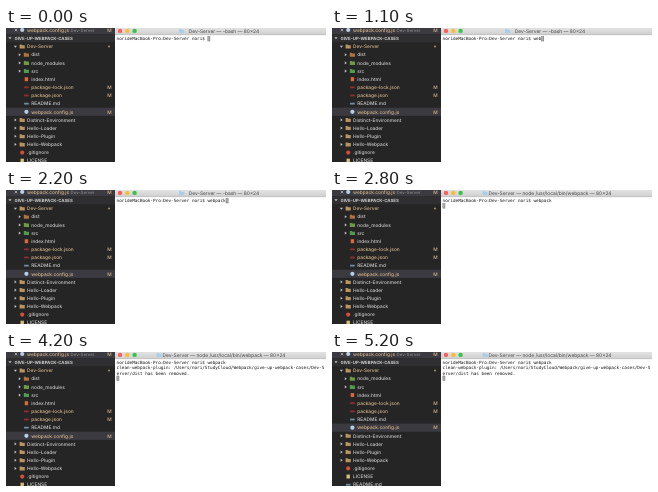
An HTML page for the animation above (5.4 s loop, 320 by 134 pixels).

```html
<!DOCTYPE html>
<html lang="en">
<head>
<meta charset="utf-8">
<title>Running webpack</title>
<style>
  html, body { margin: 0; width: 100%; height: 100%; overflow: hidden; background: #fff; }
  svg { display: block; width: 100%; height: 100%; }
  text { white-space: pre; text-rendering: geometricPrecision; }
  .ui { font-family: Inter, "Open Sans", sans-serif; font-size: 4.8px; font-weight: 500; }
  .title { font-size: 4.88px; font-weight: 400; text-anchor: middle; }
  .mono { font-family: "DejaVu Sans Mono", monospace; font-size: 4.32px; fill: #111; }
</style>
</head>
<body>
<svg id="stage" viewBox="0 0 320 134">
  <defs>
    <linearGradient id="bar" x2="0" y2="1">
      <stop stop-color="#e3e2e3"/><stop offset="1" stop-color="#d0cfd0"/>
    </linearGradient>
    <clipPath id="side"><rect width="109" height="134"/></clipPath>
  </defs>
  <g id="sidebar" clip-path="url(#side)"></g>
  <g id="terminal"></g>
</svg>
<script>
const LOOP = 5400, ROW = 8.15, COL = 2.6, LINE = 5.16, LEFT = 110.6, TOP = 8.2, EDGE = 109;
const GOLD = '#d9b98a', GREY = '#cdcdcd', DIM = '#8a8a8a', ACTIVE = '#3b3a40';
const TAN = '#b8925f', NPM = '#8f2f2c', CONFIG = '#b4cfe6', README = '#6f8fa5';
const sidebar = document.getElementById('sidebar');
const terminal = document.getElementById('terminal');

function add(parent, tag, attrs, content) {
  const node = document.createElementNS('http://www.w3.org/2000/svg', tag);
  for (const key in attrs) node.setAttribute(key, attrs[key]);
  if (content) node.textContent = content;
  parent.appendChild(node);
  return node;
}

const label = (parent, x, y, str, fill, extra) =>
  add(parent, 'text', { class: 'ui', x, y, fill, ...extra }, str);

function chevron(parent, x, y, open) {
  const d = open ? `M${x - 1.6} ${y - 0.9}h3.2l-1.6 2z` : `M${x - 0.8} ${y - 1.6}v3.2l2 -1.6z`;
  add(parent, 'path', { d, fill: '#c4c4c4' });
}

const icons = {
  folder: (g, x, y, fill) =>
    add(g, 'path', { d: `M${x} ${y - 2}h2l.7 .7h2.5v3.3h-5.2z`, fill }),
  page: (g, x, y, fill) =>
    add(g, 'rect', { x: x + 0.9, y: y - 2, width: 3.4, height: 4, fill }),
  wide: (g, x, y, fill) =>
    add(g, 'rect', { x: x + 0.3, y: y - 0.9, width: 4.6, height: 1.8, fill }),
  round: (g, x, y, fill) =>
    add(g, 'circle', { cx: x + 2.6, cy: y, r: 2.1, fill })
};

// name, depth, icon, icon colour, modified
const files = [
  ['Dev-Server', 0, 'folder', TAN, 1],
  ['dist', 1, 'folder', '#b0713c', 0],
  ['node_modules', 1, 'folder', '#6f9a44', 0],
  ['src', 1, 'folder', '#4f9a4f', 0],
  ['index.html', 1, 'page', '#d9683c', 0],
  ['package-lock.json', 1, 'wide', NPM, 1],
  ['package.json', 1, 'wide', NPM, 1],
  ['README.md', 1, 'wide', README, 0],
  ['webpack.config.js', 1, 'round', CONFIG, 1],
  ['Distinct-Environment', 0, 'folder', TAN, 0],
  ['Hello-Loader', 0, 'folder', TAN, 0],
  ['Hello-Plugin', 0, 'folder', TAN, 0],
  ['Hello-Webpack', 0, 'folder', TAN, 0],
  ['.gitignore', 0, 'round', '#d04f38', 0],
  ['LICENSE', 0, 'page', '#d6bd7a', 0],
  ['README.md', 0, 'wide', README, 0]
];

function makeRow([name, depth, icon, color, modified]) {
  const g = add(sidebar, 'g', {});
  const x = 13.6 + depth * 4.2;
  const isFolder = icon === 'folder';
  if (name === 'webpack.config.js') {
    add(g, 'rect', { y: -ROW / 2, width: EDGE, height: ROW, fill: ACTIVE });
  }
  if (isFolder) chevron(g, x - 4.2, 0, modified);
  icons[icon](g, x, 0, color);
  label(g, x + 7.4, 1.7, name, modified ? GOLD : GREY);
  if (modified && isFolder) add(g, 'circle', { cx: 103, cy: 0, r: 1, fill: GOLD, opacity: 0.75 });
  else if (modified) label(g, 101.3, 1.7, 'M', GOLD);
  return g;
}

add(sidebar, 'rect', { width: EDGE, height: 134, fill: '#252526' });
add(sidebar, 'rect', { width: EDGE, height: 6.2, fill: ACTIVE });
add(sidebar, 'path', { d: 'M8.7 .7l2.6 2.6m0 -2.6l-2.6 2.6', stroke: '#ccc', 'stroke-width': 0.7 });
icons.round(sidebar, 13.6, 2, CONFIG);
label(sidebar, 21, 3.7, 'webpack.config.js', GOLD);
label(sidebar, 64.5, 3.7, 'Dev-Server', DIM, { style: 'font-size:4.4px' });
label(sidebar, 101.3, 3.7, 'M', GOLD);
add(sidebar, 'rect', { y: 6.2, width: EDGE, height: 8, fill: '#2f2f31' });
chevron(sidebar, 4, 10.2, true);
label(sidebar, 8.4, 11.8, 'GIVE-UP-WEBPACK-CASES', '#d0d0d0', { style: 'font-size:4.35px;font-weight:700' });
const rows = files.map(makeRow);

add(terminal, 'rect', { x: EDGE, width: 320 - EDGE, height: 134, fill: '#fff' });
add(terminal, 'rect', { x: EDGE, width: 320 - EDGE, height: 7, fill: 'url(#bar)' });
add(terminal, 'rect', { x: EDGE, y: 6.7, width: 320 - EDGE, height: 0.4, fill: '#aaa' });
['#f95f58', '#fbbc35', '#35c649'].forEach((fill, i) =>
  add(terminal, 'circle', { cx: 114 + i * 7.3, cy: 2.9, r: 2.2, fill }));
const proxy = add(terminal, 'g', {});
icons.folder(proxy, 0, 3, '#a9cfe6');
const title = add(terminal, 'text', { class: 'ui title', x: 218, y: 4.6, fill: '#454545' });
const cursor = add(terminal, 'rect', {
  width: COL - 0.5, height: LINE - 0.7, fill: '#b0b0b0', stroke: '#707070', 'stroke-width': 0.5
});
const lines = [0, 1, 2].map(i =>
  add(terminal, 'text', { class: 'mono', x: LEFT, y: TOP + i * LINE + 4 }));

const PROMPT = 'norideMacBook-Pro:Dev-Server nori$ ';
const OUTPUT = [
  'clean-webpack-plugin: /Users/nori/StudyCloud/Webpack/give-up-webpack-cases/Dev-S',
  'erver/dist has been removed.'
];
const keys = [100, 200, 1100, 1800, 1900, 2200, 2200];
const ENTER = 2700, RUN = 2800, PRINT = 4200, REMOVE = 5200;

function setText(node, str) {
  if (node.textContent !== str) node.textContent = str;
}

function draw(t) {
  const typed = keys.filter(k => t >= k).length;
  const printed = t >= PRINT;
  setText(lines[0], PROMPT + 'webpack'.slice(0, typed));
  OUTPUT.forEach((str, i) => setText(lines[i + 1], printed ? str : ''));

  const col = t >= ENTER ? 0 : PROMPT.length + typed;
  const line = printed ? 3 : t >= ENTER ? 1 : 0;
  cursor.setAttribute('x', LEFT + col * COL + 0.25);
  cursor.setAttribute('y', TOP + line * LINE + 0.35);

  const running = t >= RUN;
  setText(title, `Dev-Server — ${running ? 'node /usr/local/bin/webpack' : '-bash'} — 80×24`);
  proxy.setAttribute('transform', `translate(${running ? 150.5 : 173} 0)`);

  const gone = t >= REMOVE;
  rows.forEach((row, i) => {
    const slot = gone && i > 1 ? i - 1 : i;
    row.setAttribute('transform', `translate(0 ${18.6 + slot * ROW})`);
    row.setAttribute('visibility', gone && i === 1 ? 'hidden' : 'visible');
  });
}

const start = performance.now();
function tick() {
  draw((performance.now() - start) % LOOP);
  requestAnimationFrame(tick);
}
tick();
</script>
</body>
</html>
```
